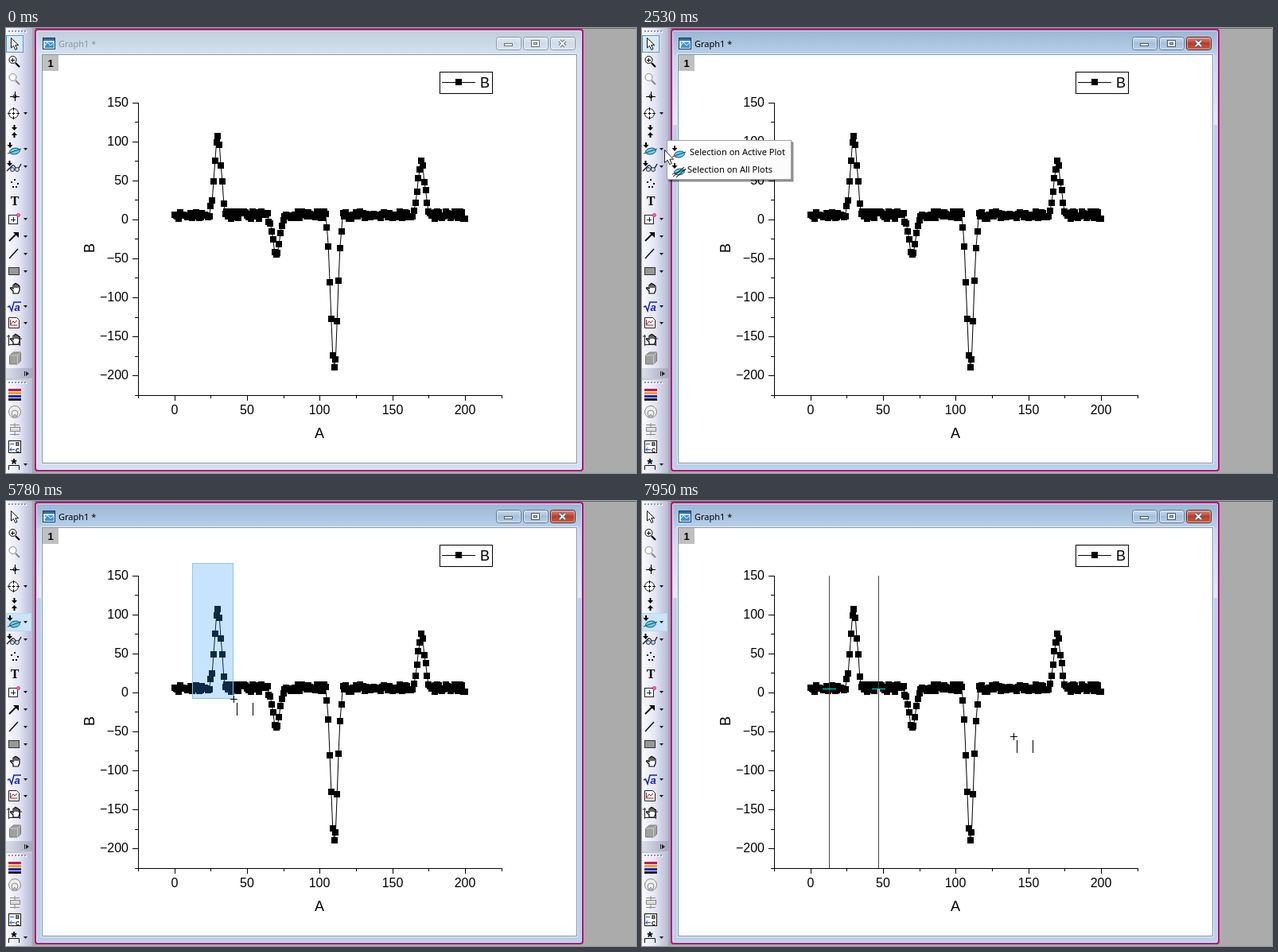
Recreate the animation shown at these times as an HTML page with a canvas. Size 792x560 px, loop 8 s.

```html
<!DOCTYPE html>
<html lang="en">
<head>
<meta charset="utf-8">
<title>Peak selection</title>
<style>
  html, body { margin: 0; width: 792px; height: 560px; overflow: hidden; background: #ababab; }
  canvas { display: block; }
</style>
</head>
<body>
<canvas id="stage" width="792" height="560"></canvas>
<script>
const c = document.getElementById('stage').getContext('2d');
const LOOP = 8000;
const PLOT = '"Liberation Sans", Arial, sans-serif';
const UI = '"Noto Sans", "Open Sans", sans-serif';

// Drawing helpers
function box(x, y, w, h, fill, stroke) {
  if (fill) { c.fillStyle = fill; c.fillRect(x, y, w, h); }
  if (stroke) {
    c.strokeStyle = stroke;
    c.lineWidth = 1;
    c.strokeRect(x + .5, y + .5, w - 1, h - 1);
  }
}
function path(d, stroke, fill, width = 1) {
  const p = new Path2D(d);
  if (fill) { c.fillStyle = fill; c.fill(p); }
  if (stroke) { c.strokeStyle = stroke; c.lineWidth = width; c.stroke(p); }
}
function round(x, y, w, h, r, fill, stroke, width = 1) {
  c.beginPath();
  c.roundRect(x, y, w, h, r);
  if (fill) { c.fillStyle = fill; c.fill(); }
  if (stroke) { c.strokeStyle = stroke; c.lineWidth = width; c.stroke(); }
}
function disc(x, y, rx, ry, stroke, fill, tilt = 0) {
  c.beginPath();
  c.ellipse(x, y, rx, ry, tilt, 0, 7);
  if (fill) { c.fillStyle = fill; c.fill(); }
  if (stroke) { c.strokeStyle = stroke; c.lineWidth = 1; c.stroke(); }
}
function text(s, x, y, font, align = 'left', fill = '#000') {
  c.font = font;
  c.textAlign = align;
  c.fillStyle = fill;
  c.fillText(s, x, y);
}
function ramp(x0, y0, x1, y1, ...colors) {
  const g = c.createLinearGradient(x0, y0, x1, y1);
  colors.forEach((k, i) => g.addColorStop(i / (colors.length - 1), k));
  return g;
}
function shifted(x, y, draw) {
  c.save();
  c.translate(x, y);
  draw();
  c.restore();
}

// Data: noise around 5 with four peaks
const peaks = {
  25: [17, 24, 49, 75, 99, 107, 96, 69, 49, 20],
  64: [8, -3, -5, -15, -26, -42, -45, -43, -32, -18, -8, -1],
  105: [-10, -35, -81, -128, -174, -190, -179, -131, -79, -37, -15],
  165: [11, 21, 35, 53, 64, 75, 69, 48, 38, 21, 10]
};
const px = a => 211.7 + a * 1.826;
const py = b => 240.82 - b * .9815;
let seed = 11;
const random = () => (seed = seed * 16807 % 2147483647) / 2147483647;
const data = Array.from({ length: 201 }, () => .5 + 10 * random());
data[0] = 6;
data[200] = 1;
for (const a in peaks) peaks[a].forEach((b, i) => data[+a + i] = b);

// Pointer moves: start, end, number of steps, points on the way
const moves = [
  [920, 1690, 11, [[654, 545], [348, 330], [107, 178]]],
  [1760, 2070, 5, [[95, 173], [28, 153]]],
  [3080, 3470, 6, [[36, 154], [79, 160]]],
  [4390, 4470, 2, [[83, 162], [86, 164]]],
  [4700, 5240, 8, [[95, 158], [234, 83]]],
  [5390, 6160, 11, [[236, 80], [286, 249], [290, 412]]],
  [6240, 6390, 3, [[293, 422], [298, 438]]],
  [7320, 7320, 1, [[298, 444]]],
  [7640, 7950, 5, [[318, 426], [467, 296]]]
];
function pointer(t) {
  const move = moves.filter(m => t >= m[0]).pop();
  if (!move) return null;
  const [start, end, n, pts] = move;
  if (n === 1) return pts[0];
  const step = Math.min(n - 1, Math.floor((t - start + 8) / (end - start) * (n - 1)));
  const u = step / (n - 1) * (pts.length - 1);
  const i = Math.min(pts.length - 2, Math.floor(u));
  return pts[i].map((v, k) => Math.round(v + (pts[i + 1][k] - v) * (u - i)));
}

// Toolbar
function ellipseTool(x, y, crossed) {
  shifted(x, y, () => {
    path('M4 -8v4', '#000', null, 2);
    path('M0.5 -5h7l-3.5 4z', null, '#000');
    disc(10, 3, 6.5, 3.8, '#246', '#5fd4f4', -.2);
    path('M1 6L18 0', '#245');
    if (crossed) path('M2 9L16 -3M6 10L18 -1', '#000');
  });
}
function hand(x, y) {
  shifted(x, y, () => path('M4 13V10L0.5 6.5Q1 4.5 4 7V2.5Q5 1 6 2.5V1Q7 0 8 1V2Q9 0.5 10 2V3.5Q11 2 12 4V9L10.5 13z' +
    'M6 2.5V6M8 2V6M10 3.5V6', '#000', '#fff', 1.2));
}
function magnifier(y, ink, plus) {
  disc(8.5, y - 2, 4.5, 4.5, ink, '#fff');
  path(`M12 ${y + 2}l5 5`, ink, null, 2.2);
  if (plus) path(`M6 ${y - 1.5}h5M8.5 ${y - 4}v5`, ink);
}
function grip(y) {
  for (let x = 3; x < 26; x += 4) {
    box(x + 1, y + 1, 2, 2, '#fff');
    box(x, y, 2, 2, '#9494ac');
  }
}
function toolbar(t) {
  box(0, 0, 36, 560, '#c8c8d4');
  const bar = ramp(0, 0, 33, 0, '#fbfbff', '#e4e6f5', '#b6bad4');
  box(0, 0, 33, 428, bar);
  box(0, 428, 33, 13, ramp(0, 0, 33, 0, '#dcdeea', '#a5a8c0'));
  box(0, 443, 33, 117, bar);
  box(33, 0, 3, 560, '#a7a7ad');
  grip(3);
  grip(445);
  if (t < 4160) box(0, 9, 22, 22, '#d9e9f6', '#5b9bc8');
  if (t >= 2300 && t < 2530) box(0, 141, 32, 23, '#dcecfa', '#9cc9ec');
  if (t >= 4160) box(-1, 141, 33, 23, '#cce4f7', '#b4d8f2');

  path('M6.5 12.5V25l3-2.6 2.3 5 2.2-1-2.3-4.8h4z', '#111', '#fff');
  magnifier(42, '#000', true);
  magnifier(64, '#888', false);
  path('M5 86.5h12M11.5 80v12', '#000');
  disc(11, 86, 2, 2, '#000');
  disc(9.5, 107.5, 6, 6, '#222', '#fff');
  path('M2 107.5h4M13 107.5h4M9.5 100v4M9.5 111v4M7.5 107.5h4M9.5 105.5v4', '#000');
  path('M10.5 122v4M10.5 138v-4', '#000', null, 2);
  path('M7 125h7l-3.5 4zM7 135h7l-3.5-4z', null, '#000');
  ellipseTool(1, 152);
  path('M4.5 167v4', '#000', null, 2);
  path('M1 170h7l-3.5 4z', null, '#000');
  path('M1 180L7 174Q10 171 12 176T19 171', '#112', null, 1.3);
  disc(8, 178, 2.5, 2.5, '#234', '#cde');
  disc(14, 178, 2.5, 2.5, '#234', '#cde');
  for (const [x, y] of [[6, 193], [10, 190], [14, 195], [8, 199], [12, 199]]) box(x, y, 2, 2, '#111');
  text('T', 11, 223, 'bold 16px "Liberation Serif", Times, serif', 'center');
  box(3, 235, 12, 12, '#fff', '#222');
  path('M6 241.5h6M9.5 238v6', '#222');
  disc(15.5, 235.5, 2, 2, '#d0307c', '#f6b');
  path('M4 268L14 258', '#000', null, 1.8);
  path('M9 257h7v7z', null, '#000');
  path('M4 290L15 278', '#000', null, 1.3);
  box(3, 301, 14, 10, '#979797', '#333');
  hand(5, 321);
  path('M2 351l2.5-1 2.5 6 3-11h9', '#1420b4', null, 1.5);
  text('a', 14, 356, `italic bold 13px ${PLOT}`, 'center', '#1420b4');
  path('M3.5 364.5h10l3 3v10h-13z', '#222', '#fff');
  path('M5.5 367v7h9M6 373l3-4 2 2 3-3', '#922');
  hand(5, 385);
  path('M3.5 386v14M17.5 388v12M3 398.5h15M1 388h4M15 391h5', '#222');
  path('M4.5 412l5-4h9v11l-4 4h-10z', '#777', '#a0a0a0');
  path('M4.5 412h10l4-4M14.5 412v11', '#ccc');
  path('M23.5 432v6', '#222');
  path('M25 432l4 3-4 3z', null, '#222');
  ['#c0185a', '#f0a020', '#1828c8', '#181818'].forEach((k, i) => box(3, 454 + i * 4, 16, 3, k));
  disc(11, 483, 7.5, 7.5, '#888', '#eee');
  disc(11, 485, 4, 4, '#888');
  path('M8 490l3-4 3 4', '#888');
  path('M11 497v16M5 499.5h12M5 511.5h12', '#888');
  box(5, 502, 13, 6, '#ddd', '#888');
  box(3, 519, 16, 16, '#fff', '#111');
  text('B', 17, 526, `bold 7px ${PLOT}`, 'right');
  text('C', 17, 534, `bold 7px ${PLOT}`, 'right');
  path('M5 523.5h5M5 530.5h6M7 528l-2 2.5 2 2.5', '#2048d0');
  text('*', 10, 555, `bold 18px ${PLOT}`, 'center');
  path('M3.5 556v-5.5h13V556', '#111');
  for (const y of [107, 152, 174, 240, 262, 284, 306, 350, 371, 549]) {
    path(`M22 ${y - 1}h5l-2.5 3z`, null, '#111');
  }
}

// Graph window
function button(x, active, red) {
  const face = !active ? ['#e3ebf3', '#cfdbe8', '#dae5f0']
    : red ? ['#dc9a8e', '#b83c28', '#c8644c'] : ['#d0e0f1', '#a5bfdb', '#bdd3ea'];
  const edge = !active ? '#8996a6' : red ? '#5a2018' : '#5f7690';
  round(x + .5, 11.5, 31, 16, 3, ramp(0, 11, 0, 28, ...face), edge);
  round(x + 1.5, 12.5, 29, 14, 2, null, 'rgba(255,255,255,.5)');
}
function frame(active) {
  box(36, 0, 756, 560, '#ababab');
  box(36, 0, 756, 1, '#686868');
  round(37, 2, 688, 555, 3, active ? '#b9d1ea' : '#d3e0ee');
  if (active) {
    const side = ramp(0, 34, 0, 122, '#c4d7ec', '#e2ecf8');
    box(38, 34, 7, 88, side);
    box(717, 34, 7, 88, side);
  }
  box(38, 3, 686, 31, ramp(0, 3, 0, 34, ...(active ? ['#9bb6d3', '#b9d1ea'] : ['#c0cedc', '#d5e2f0'])));
  box(38, 3, 686, 553, null, active ? '#d4e4f4' : '#e4edf6');
  round(37, 2, 688, 555, 3, null, '#b5007d', 2);
  box(44, 32, 675, 517, null, '#e6eff8');
  box(45, 33, 673, 515, '#fff', '#8794a3');

  box(46, 12, 16, 15, '#d4e9fb', '#1c3c60');
  box(47, 13, 14, 3, '#2f6cb4');
  box(49, 18, 11, 7, '#3f93d0');
  path('M49 22q3-6 5-2t6-2', '#fff');
  text('Graph1 *', 66, 24, `11px ${UI}`, 'left', active ? '#000' : '#8b95a0');
  button(616, active);
  button(650, active);
  button(684, active, true);
  const edge = active ? '#44566a' : '#66717e';
  box(626, 19, 11, 4, '#fff', edge);
  box(660, 15, 11, 9, '#fff', edge);
  box(663, 18, 5, 3, '#c6d4e4', edge);
  path('M696 16l7 7M703 16l-7 7', edge, null, 4);
  path('M696 16l7 7M703 16l-7 7', '#fff', null, 2);
  box(46, 34, 20, 20, '#c0c0c0');
  text('1', 56, 49, `bold 13px ${PLOT}`, 'center');
}
function marker(x, y) {
  box(Math.round(x) - 4, Math.round(y) - 4, 8, 8, '#000');
}
function plot() {
  box(166, 94, 1, 369, '#000');
  box(166, 462, 458, 1, '#000');
  const minus = v => String(v).replace('-', '−');
  for (let v = -225; v <= 150; v += 25) {
    const y = Math.round(py(v)), major = v % 50 === 0;
    box(major ? 159 : 162, y, major ? 7 : 4, 1, '#000');
    if (major) text(minus(v), 154, y + 5, `16px ${PLOT}`, 'right');
  }
  for (let v = -25; v <= 225; v += 25) {
    const x = Math.round(px(v)), major = v % 50 === 0;
    box(x, 463, 1, major ? 6 : 3, '#000');
    if (major) text(v, x, 486, `16px ${PLOT}`, 'center');
  }
  text('A', 394, 516, `18px ${PLOT}`, 'center');
  shifted(111, 277, () => {
    c.rotate(-Math.PI / 2);
    text('B', 0, 0, `18px ${PLOT}`, 'center');
  });
  path('M' + data.map((b, a) => px(a) + ' ' + py(b)).join('L'), '#000');
  data.forEach((b, a) => marker(px(a), py(b)));

  box(545, 55, 67, 28, '#fff', '#000');
  box(548, 68, 42, 1, '#000');
  marker(569, 68);
  text('B', 596, 75, `18px ${PLOT}`);
}
function menu(hot) {
  box(34, 144, 157, 50, 'rgba(0,0,0,.2)');
  box(33, 143, 157, 50, 'rgba(0,0,0,.3)');
  box(31, 141, 157, 50, '#fcfcfc', '#a0a0a0');
  if (hot) box(34, 145, 150, 22, '#d4e8f8', '#a8d2f0');
  ellipseTool(37, 156);
  ellipseTool(37, 178, true);
  text('Selection on Active Plot', 60, 160, `11px ${UI}`);
  text('Selection on All Plots', 57, 182, `11px ${UI}`);
}

// Pointer shapes, drawn with the hot spot at 0,0
function arrow(badge) {
  path('M.5 .5V16.5L4.2 13.2 6.7 18.7 9.3 17.5 6.9 12.2H11.5z', '#222', '#fff');
  if (!badge) return;
  box(12, 17, 18, 13, '#fff', '#000');
  for (const [x, y] of [[14, 19], [19, 19], [24, 19], [14, 24], [19, 24]]) box(x, y, 4, 4, null, '#000');
}
function cross() {
  box(-4, 0, 9, 1, '#000');
  box(0, -4, 1, 9, '#000');
  box(4, 5, 1, 16, '#000');
  box(24, 5, 1, 16, '#000');
}

function draw(t) {
  const at = pointer(t);
  frame(t >= 2530);
  plot();
  toolbar(t);
  if (t >= 2530 && t < 4080) menu(t >= 3080);
  if (t >= 5390 && t < 6940) {
    box(234, 78, at[0] - 234, at[1] - 78, 'rgba(51,153,255,.27)', '#90c4f0');
  }
  if (t >= 6940) {
    for (const x of [235, 297]) {
      box(x, 94, 1, 368, '#484848');
      box(x - 8, 236, 17, 1, '#00e4e4');
    }
  }
  if (at) shifted(at[0], at[1], () => t < 4160 ? arrow(t >= 4080) : cross());
}

const begin = performance.now();
function tick() {
  draw((performance.now() - begin) % LOOP);
  requestAnimationFrame(tick);
}
tick();
</script>
</body>
</html>
```
